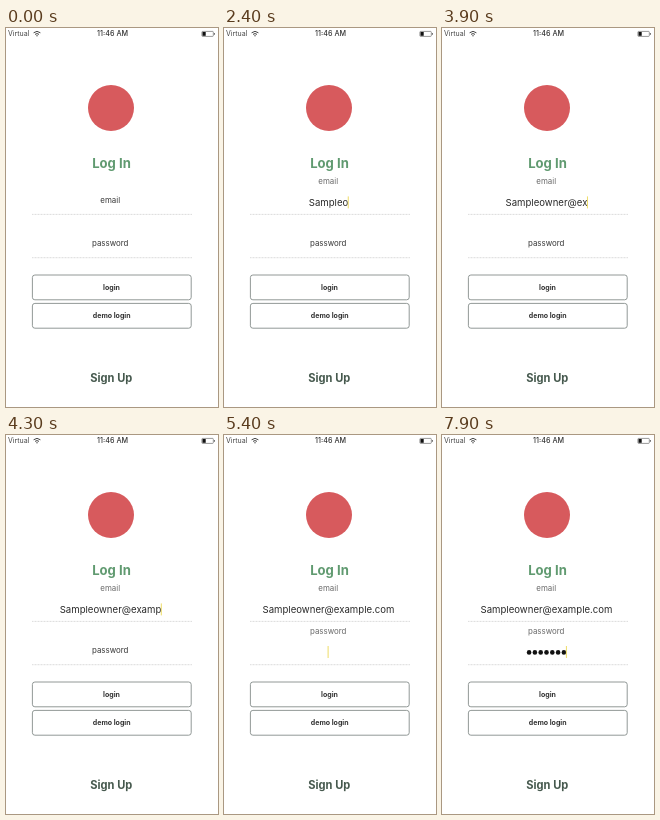
An HTML page that plays this animation: 212 px wide and 379 px high, repeating every 8000 ms.

```html
<!DOCTYPE html>
<html lang="en">
<head>
<meta charset="utf-8">
<title>Log In</title>
<style>
html, body { margin: 0; width: 100%; height: 100%; overflow: hidden; background: #fff; }
svg { display: block; width: 100%; height: 100%; font-family: Inter, Roboto, sans-serif; }
.mid { text-anchor: middle; }
.status { font-size: 7px; fill: #444; }
.clock { font-size: 7.2px; font-weight: 500; fill: #333; }
.label { font-size: 7.9px; }
.value { font-size: 9.6px; fill: #2a2a2a; }
.button { font-size: 7px; font-weight: 700; fill: #333; }
.box { fill: #fff; stroke: #868e8c; stroke-width: .9; }
.rule { stroke: #ccc; stroke-width: .7; stroke-dasharray: 1 .5; }
.caret { fill: #eedc68; }
</style>
</head>
<body>
<svg viewBox="0 0 212 379">
  <rect width="212" height="379" fill="#fff"/>

  <text class="status" x="2" y="8.4">Virtual</text>
  <g fill="none" stroke="#444" stroke-width="1">
    <path d="M27.6 4.8Q31 1.9 34.4 4.8M29 6.4Q31 4.7 33 6.4"/>
    <circle cx="31" cy="7.7" r=".7" fill="#444" stroke="none"/>
  </g>
  <text class="clock mid" x="106.6" y="8.4">11:46 AM</text>
  <rect x="195.9" y="3.4" width="11.4" height="5" rx=".8" fill="none" stroke="#555" stroke-width=".6"/>
  <rect x="196.5" y="4" width="3.2" height="3.8" fill="#111"/>
  <rect x="207.9" y="5" width=".9" height="1.8" fill="#555"/>

  <circle cx="105" cy="80" r="23" fill="#d75a5d"/>
  <text class="mid" x="105.5" y="140.2" font-size="13.1" font-weight="700" fill="#609a70">Log In</text>

  <path class="rule" d="M26 186.4H186M26 229.7H186"/>
  <text class="label mid" id="emailLabel" x="104.2">email</text>
  <text class="value mid" id="email" x="104.5" y="177.8"></text>
  <text class="label mid" id="passwordLabel" x="104.2">password</text>
  <g id="dots" fill="#111"></g>
  <rect class="caret" id="caret" width="1" height="12"/>

  <rect class="box" x="26.4" y="247" width="158.8" height="24.8" rx="2.5"/>
  <rect class="box" x="26.4" y="275.4" width="158.8" height="24.8" rx="2.5"/>
  <text class="button mid" x="105.5" y="262">login</text>
  <text class="button mid" x="105.7" y="290.4">demo login</text>
  <text class="mid" x="105.3" y="353.7" font-size="11.1" font-weight="700" fill="#46594e">Sign Up</text>
</svg>
<script>
const LOOP = 8000;
const ADDRESS = 'Sampleowner@example.com';
const EMAIL_FOCUS = 600, PASSWORD_FOCUS = 5220;
const DOT_COUNT = 7, DOT_PITCH = 5.8, CENTER = 104.5;

const $ = id => document.getElementById(id);
const steps = (count, start, gap) => Array.from({ length: count }, (_, i) => start + i * gap);
const emailKeys = [...steps(11, 1200, 200), 3550, ...steps(8, 3720, 125), ...steps(3, 4690, 160)];
const passwordKeys = steps(DOT_COUNT, 5640, 130);
const typed = (keys, t) => keys.filter(k => k <= t).length;

const dots = passwordKeys.map(() => {
  const dot = document.createElementNS('http://www.w3.org/2000/svg', 'circle');
  dot.setAttribute('r', 2.3);
  dot.setAttribute('cy', 217.4);
  return $('dots').appendChild(dot);
});

// The placeholder rises above its field on focus.
function floatLabel(label, restY, focusAt, t) {
  const p = Math.min(1, Math.max(0, (t - focusAt) / 180));
  const eased = 1 - (1 - p) ** 2;
  const gray = Math.round(55 + 50 * eased);
  label.setAttribute('y', restY - 19 * eased);
  label.setAttribute('fill', `rgb(${gray},${gray},${gray})`);
}

function showCaret(x, y, keys, focusAt, t) {
  const lastKey = Math.max(focusAt, ...keys.filter(k => k <= t));
  const visible = t >= focusAt && (t - lastKey) % 1000 < 600;
  $('caret').setAttribute('x', x);
  $('caret').setAttribute('y', y);
  $('caret').setAttribute('visibility', visible ? 'visible' : 'hidden');
}

function render(t) {
  floatLabel($('emailLabel'), 174.6, EMAIL_FOCUS, t);
  floatLabel($('passwordLabel'), 217.8, PASSWORD_FOCUS, t);

  $('email').textContent = ADDRESS.slice(0, typed(emailKeys, t));
  const count = typed(passwordKeys, t);
  dots.forEach((dot, i) => {
    dot.setAttribute('cx', CENTER + (i - (count - 1) / 2) * DOT_PITCH);
    dot.setAttribute('visibility', i < count ? 'visible' : 'hidden');
  });

  if (t < PASSWORD_FOCUS) {
    const half = $('email').getComputedTextLength() / 2;
    showCaret(CENTER - .5 + half, 168.4, emailKeys, EMAIL_FOCUS, t);
  } else {
    showCaret(CENTER - .9 + count * DOT_PITCH / 2, 211, passwordKeys, PASSWORD_FOCUS, t);
  }
}

const start = performance.now();
function tick() {
  render((performance.now() - start) % LOOP);
  requestAnimationFrame(tick);
}
tick();
</script>
</body>
</html>
```
